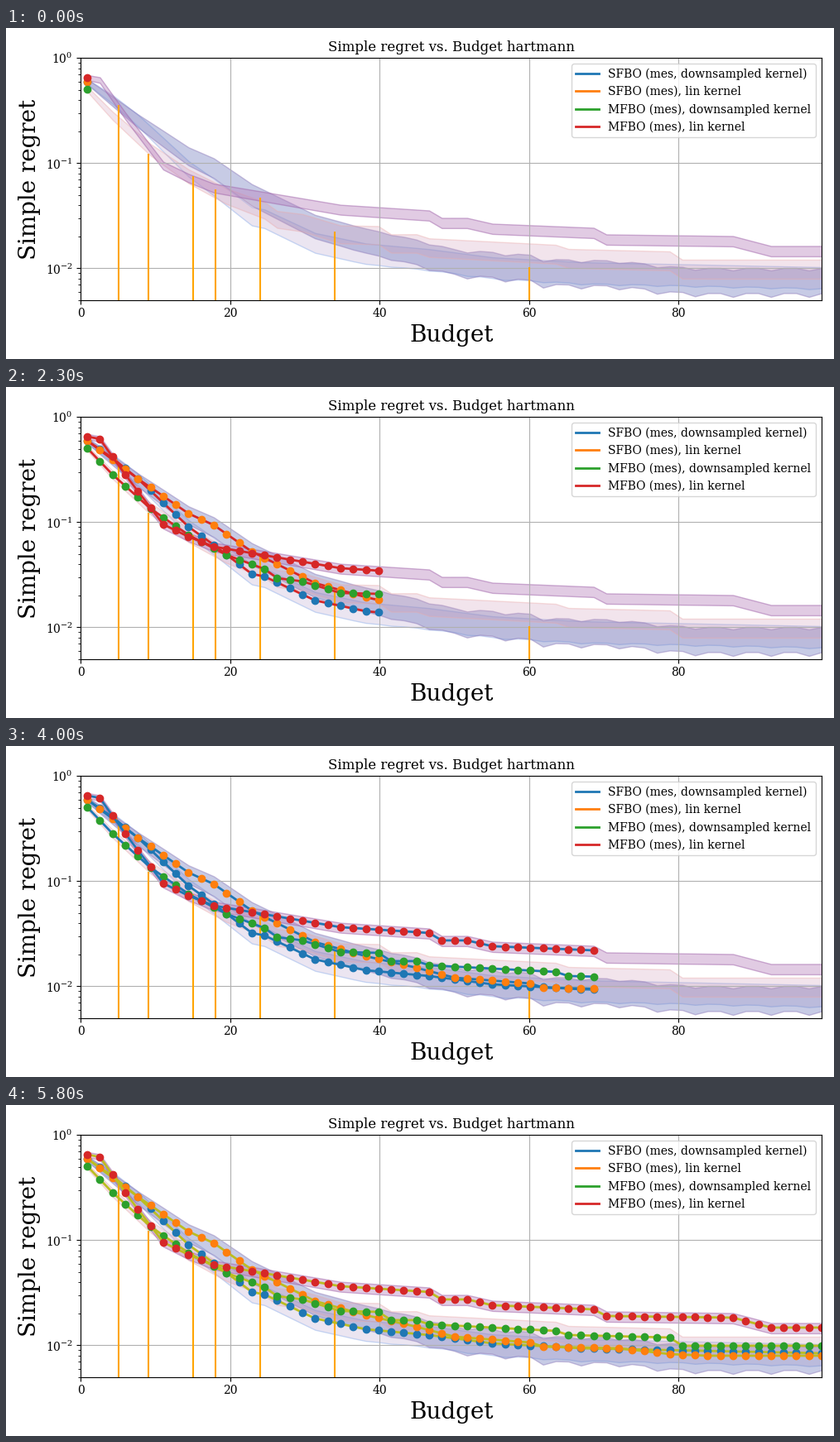
A matplotlib script that plays this animation: 1000x400 px, repeating every 5900 ms.

```python
import numpy as np
import matplotlib.pyplot as plt
from matplotlib.animation import FuncAnimation
from matplotlib.lines import Line2D

plt.rcParams.update({
    "font.family": "DejaVu Serif",
    "mathtext.fontset": "dejavuserif",
    "font.size": 10,
})

N = 59
STEP = np.arange(N)
BUDGET = (STEP + 0.5) * 100 / N
TOP, DECADE = 36.5, 127.0


def regret(y):
    """Height on the stage in pixels -> value on the log axis."""
    return 10 ** (-(np.asarray(y) - TOP) / DECADE)


def mean_curve(*knots):
    """Straight runs between a few (step, height) points."""
    return np.interp(STEP, *zip(*knots))


def spread(limit, start=3, tau=8):
    """Half width of a band, growing towards its limit."""
    return start + (limit - start) * (1 - np.exp(-STEP / tau))


def rgba(r, g, b, a):
    return (r / 255, g / 255, b / 255, a)


# ragged band edges that repeat every three steps once the curve flattens
ripple = np.clip((STEP - 20) / 10, 0, 1) * np.cos(2 * np.pi * STEP / 3)

sf_down = mean_curve((0, 65), (2, 86), (4, 111), (8, 169), (10, 191),
                     (13, 226), (14, 229), (18, 258), (22, 271), (27, 278),
                     (32, 288), (39, 294), (58, 300))
sf_lin = mean_curve((0, 65), (4, 111), (8, 153), (10, 167), (13, 199),
                    (18, 237), (22, 254), (26, 268), (29, 280), (35, 287),
                    (36, 292), (42, 294), (46, 301), (49, 303), (58, 303))
mf_down = mean_curve((0, 74), (2, 106), (5, 147), (8, 179), (11, 203),
                     (14, 220), (15, 231), (17, 235), (20, 249), (23, 250),
                     (24, 260), (26, 260), (27, 265), (37, 273), (38, 278),
                     (46, 281), (47, 291), (58, 291))
mf_lin = mean_curve((0, 60), (1, 63), (3, 106), (6, 166), (8, 181),
                    (10, 193), (15, 206), (20, 219), (27, 226), (28, 235),
                    (30, 235), (32, 242), (40, 247), (41, 255), (51, 257),
                    (54, 269), (58, 269))

# name, mean, limits above and below, ripple of both edges, fill, outline
series = [
    ("SFBO (mes, downsampled kernel)", sf_down, 11, 15, 0, 1,
     rgba(205, 190, 222, 0.4), rgba(150, 180, 235, 0.5)),
    ("SFBO (mes), lin kernel", sf_lin, 12, 19, 2, 3,
     rgba(115, 125, 190, 0.4), rgba(140, 120, 185, 0.45)),
    ("MFBO (mes), downsampled kernel", mf_down, 11, 12, 0, 0,
     rgba(205, 150, 180, 0.25), rgba(235, 170, 170, 0.4)),
    ("MFBO (mes), lin kernel", mf_lin, 5.5, 7, 0, 0,
     rgba(182, 125, 187, 0.4), rgba(160, 100, 170, 0.5)),
]

fig, ax = plt.subplots(figsize=(10, 4), dpi=100)
ax.set_yscale("log")
ax.set_xlim(0, BUDGET[-1])
ax.set_ylim(0.005, 1)
ax.grid(True)
ax.set_title("Simple regret vs. Budget hartmann", fontsize=12)
ax.set_xlabel("Budget", fontsize=20)
ax.set_ylabel("Simple regret", fontsize=20)

lines, values, handles = [], [], []
for i, (name, mean, up, down, rag_hi, rag_lo, face, edge) in enumerate(series):
    hi = mean - spread(up) + rag_hi * ripple
    lo = mean + spread(down) + rag_lo * ripple
    ax.fill_between(BUDGET, regret(lo), regret(hi),
                    facecolor=face, edgecolor=edge, linewidth=1)
    lines += ax.plot([], [], "o-", lw=2, mfc=f"C{i}", mec=f"C{i}")
    values.append(regret(mean))
    handles.append(Line2D([], [], color=f"C{i}", lw=2, label=name))

marks = {5: 93, 9: 152, 15: 179, 18: 195, 24: 205, 34: 246, 60: 289}
ax.vlines(list(marks), 0.001, regret(list(marks.values())),
          color="orange", zorder=1.9)
ax.legend(handles=handles, loc="upper right")
fig.tight_layout()


def draw(k):
    for line, v in zip(lines, values):
        line.set_data(BUDGET[:k + 1], v[:k + 1])
        line.set_color(f"C{k % 10}")
    return lines


anim = FuncAnimation(fig, draw, frames=N, init_func=lambda: draw(0),
                     interval=100, repeat=True, blit=False)
plt.show()
```
